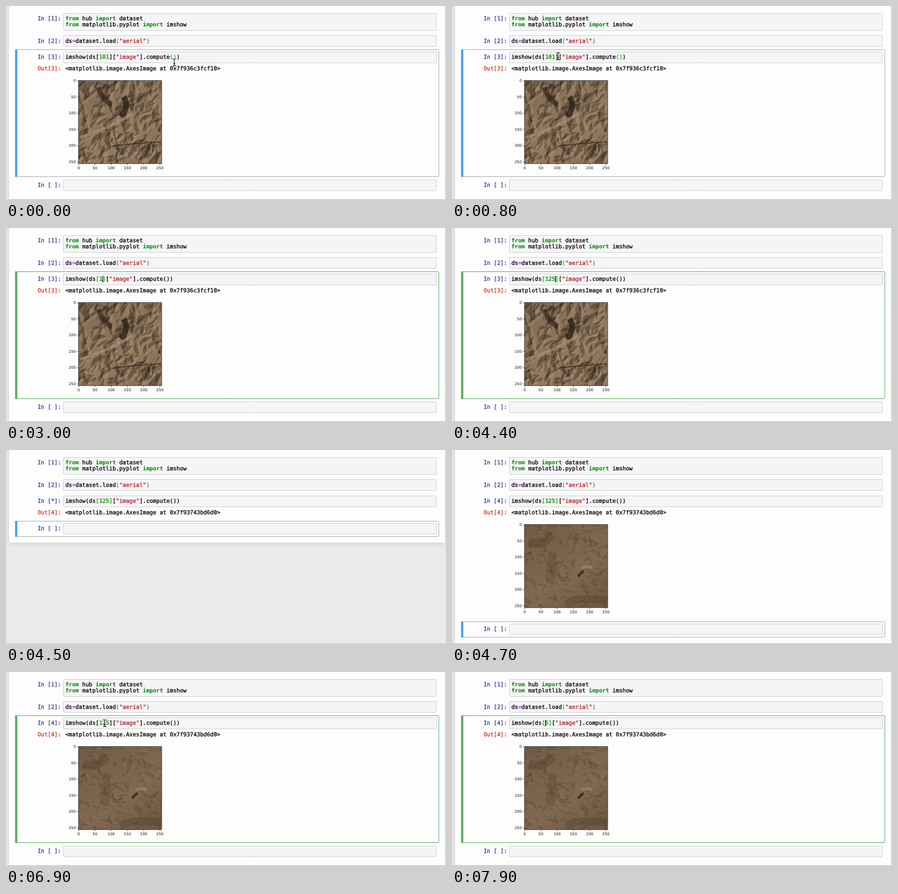
Write an HTML page with a canvas that moves like this. It is 800 by 353 pixels and loops after 8000 ms.

```html
<!DOCTYPE html>
<html lang="en">
<head>
<meta charset="utf-8">
<title>Notebook</title>
<style>
  html, body { margin: 0; width: 100%; height: 100%; overflow: hidden; background: #ebe9ec; }
  canvas { display: block; width: 800px; height: 353px; }
</style>
</head>
<body>
<canvas id="stage" width="800" height="353"></canvas>
<script>
const ctx = document.getElementById('stage').getContext('2d');
const LOOP = 8000, RUN = 4500, DONE = 4600, CLICK1 = 1000, CLICK2 = 6100, BLINK = 500;
const MONO = '"DejaVu Sans Mono", "Liberation Mono", monospace';
const SIZE = 10.18, CHAR = SIZE * 0.60205, CODE_X = 108;
const INK = '#000', KEY = '#008000', NUM = '#008800', STR = '#ba2121', MATCH = '#00bb00';
const IN = '#303f9f', OUT = '#d03a1b', BLUE = '#429fee', GREEN = '#54ad59';

// Clicks place the caret; '<' is backspace, other keys are typed
const keys = [
  { at: CLICK1, caret: 3 }, { at: 2400, key: '<' }, { at: 2800, key: '<' },
  { at: 3100, key: '2' }, { at: 3400, key: '5' },
  { at: CLICK2, caret: 2 }, { at: 7200, key: '<' }, { at: 7500, key: '<' }
];

function editAt(t) {
  let index = '101', caret = -1, since = 0;
  for (const k of keys) {
    if (k.at > t) break;
    since = k.at;
    if (k.caret !== undefined) { caret = k.caret; continue; }
    const erase = k.key === '<';
    index = index.slice(0, erase ? caret - 1 : caret) + (erase ? '' : k.key) + index.slice(caret);
    caret += erase ? -1 : 1;
  }
  return { index, caret, since };
}

const moves = [
  { from: 0, to: 900, x: 189, y: 91 },
  { from: 1100, to: 1300, x: 200.5, y: 93 },
  { from: 5300, to: 5800, x: 179.5, y: 93 }
];

function text(runs, x, y) {
  ctx.lineWidth = 0.3;
  for (const [str, color = INK, weight = ''] of runs) {
    ctx.font = `${weight} ${SIZE}px ${MONO}`;
    ctx.fillStyle = ctx.strokeStyle = color;
    ctx.fillText(str, x, y);
    if (!weight) ctx.strokeText(str, x, y);
    x += ctx.measureText(str).width;
  }
}

function prompt(str, y, color = IN) {
  text([[str, color]], 100.3 - str.length * CHAR, y);
}

function box(x, y, w, h, fill, stroke) {
  ctx.beginPath();
  ctx.roundRect(x, y, w, h, 1.5);
  if (fill) { ctx.fillStyle = fill; ctx.fill(); }
  ctx.strokeStyle = stroke;
  ctx.lineWidth = 1;
  ctx.stroke();
}

const field = (y, h) => box(104.5, y, 678, h, '#f5f4f6', '#cfced1');

function selection(y, h, bar, border) {
  box(17.5, y, 769.5, h, null, border);
  ctx.fillStyle = bar;
  ctx.fillRect(16.5, y - 0.5, 4, h + 1);
}

function seeded(seed) {
  return () => (seed = (seed * 16807) % 2147483647) / 2147483647;
}

// Ground seen from above: a gradient, then folds with one dark and one lit side
function aerial({ seed, tones, count, size, tilt, spread, dark, light }, marks) {
  const c = document.createElement('canvas');
  c.width = c.height = 152;
  const g = c.getContext('2d'), rnd = seeded(seed);
  const base = g.createLinearGradient(0, 0, 110, 152);
  tones.forEach((tone, i) => base.addColorStop(i / (tones.length - 1), tone));
  g.fillStyle = base;
  g.fillRect(0, 0, 152, 152);
  g.filter = 'blur(0.6px)';
  for (let i = 0; i < count; i++) {
    const len = size * (1.2 - i / count) * (0.4 + rnd()), wide = len * (0.15 + rnd() * 0.25);
    g.save();
    g.translate(rnd() * 152, rnd() * 152);
    g.rotate(tilt + (rnd() - 0.5) * spread);
    for (const [color, side] of [[dark, 1], [light, -1]]) {
      g.fillStyle = color;
      g.beginPath();
      g.moveTo(-len / 2, 0);
      g.quadraticCurveTo(len * (rnd() - 0.5), side * wide * 2, len / 2, 0);
      g.fill();
    }
    g.restore();
  }
  marks(g);
  return c;
}

function curve(g, color, width, ...p) {
  g.strokeStyle = color;
  g.lineWidth = width;
  g.beginPath();
  g.moveTo(p[0], p[1]);
  g.quadraticCurveTo(...p.slice(2));
  g.stroke();
}

const hills = aerial({
  seed: 17, tones: ['#7d6850', '#8a7259', '#937b60', '#8a735a'], count: 330, size: 25, tilt: 2.1, spread: 1.5,
  dark: 'rgba(40,31,23,.36)', light: 'rgba(180,152,120,.27)'
}, g => {
  curve(g, 'rgba(36,28,21,.75)', 10, 82, 30, 94, 46, 78, 66);
  curve(g, 'rgba(36,28,21,.6)', 9, 36, 12, 42, 34, 60, 44);
  curve(g, 'rgba(184,152,122,.55)', 5, 2, 104, 50, 90, 98, 61);
  curve(g, 'rgba(36,28,21,.6)', 2, 60, 120, 110, 114, 151, 112);
});
const plain = aerial({
  seed: 91, tones: ['#705b44', '#7b634b', '#816a52', '#725b43'], count: 330, size: 17, tilt: 1.8, spread: 5,
  dark: 'rgba(58,45,32,.17)', light: 'rgba(160,130,100,.11)'
}, g => {
  curve(g, 'rgba(62,51,37,.25)', 16, 8, 32, 30, 42, 52, 18);
  curve(g, 'rgba(58,46,33,.2)', 14, 48, 50, 58, 80, 46, 108);
  curve(g, 'rgba(57,45,33,.22)', 15, 75, 145, 110, 132, 151, 139);
  curve(g, 'rgba(178,132,104,.65)', 5, 104, 80, 112, 75, 124, 79);
  curve(g, 'rgba(38,29,22,.8)', 4, 98, 95, 102, 89, 108, 85);
});

function plot(photo) {
  const x0 = 131.8, y0 = 135.6, side = 151.3, step = side / 256;
  ctx.drawImage(photo, x0, y0, side, side);
  ctx.strokeStyle = '#222';
  ctx.lineWidth = 0.8;
  ctx.strokeRect(x0, y0, side, side);
  ctx.font = '6.8px "DejaVu Sans", sans-serif';
  ctx.fillStyle = '#111';
  ctx.beginPath();
  for (let v = 0; v <= 250; v += 50) {
    const d = (v + 0.5) * step;
    ctx.moveTo(x0 + d, y0 + side);
    ctx.lineTo(x0 + d, y0 + side + 2.5);
    ctx.moveTo(x0, y0 + d);
    ctx.lineTo(x0 - 2.5, y0 + d);
    ctx.textAlign = 'center';
    ctx.fillText(v, x0 + d, 296.7);
    ctx.textAlign = 'right';
    ctx.fillText(v, 127, y0 + d + 2.4);
  }
  ctx.stroke();
  ctx.textAlign = 'left';
}

function pointer(t) {
  if ((t >= 2500 && t < 5300) || t >= 7200) return;
  let x = 306, y = 102.5;
  for (const m of moves) {
    if (t < m.from) break;
    const u = Math.min(1, (t - m.from) / (m.to - m.from)), e = u * u * (3 - 2 * u);
    x += (m.x - x) * e;
    y += (m.y - y) * e;
  }
  for (const [color, width] of [['#fff', 2.8], ['#111', 1.2]]) {
    ctx.strokeStyle = color;
    ctx.lineWidth = width;
    ctx.beginPath();
    for (const s of [-1, 1]) {
      ctx.moveTo(x - 3.2, y + s * 6.5);
      ctx.quadraticCurveTo(x, y + s * 6.5, x, y + s * 4.5);
      ctx.quadraticCurveTo(x, y + s * 6.5, x + 3.2, y + s * 6.5);
    }
    ctx.moveTo(x, y - 5);
    ctx.lineTo(x, y + 5);
    ctx.moveTo(x - 1.6, y + 2.2);
    ctx.lineTo(x + 1.6, y + 2.2);
    ctx.stroke();
  }
}

function page(bottom) {
  ctx.fillStyle = '#ebe9ec';
  ctx.fillRect(0, 0, 800, 353);
  ctx.save();
  ctx.shadowColor = 'rgba(87,87,87,.25)';
  ctx.shadowBlur = 9;
  ctx.fillStyle = '#fefdfe';
  ctx.fillRect(5.5, -20, 792.5, bottom + 20);
  ctx.restore();
  ctx.fillStyle = '#c4c3c6';
  ctx.fillRect(0, 352, 800, 1);
}

function draw(t) {
  const { index, caret, since } = editAt(t);
  const running = t >= RUN && t < DONE, ran = t >= RUN;
  const editing = (t >= CLICK1 && t < RUN) || t >= CLICK2;
  const last = running ? 133.5 : 316.5;

  page(last + 35);
  if (editing) selection(79.5, 231, GREEN, GREEN);
  else if (t < CLICK1) selection(79.5, 231, BLUE, '#ababab');
  else selection(last - 4, 28, BLUE, '#ababab');

  field(13.5, 31);
  prompt('In [1]:', 26.2);
  text([['from', KEY, 'bold'], [' hub '], ['import', KEY, 'bold'], [' dataset']], CODE_X, 26.2);
  text([['from', KEY, 'bold'], [' matplotlib.pyplot '], ['import', KEY, 'bold'], [' imshow']], CODE_X, 37);

  field(53.5, 20);
  prompt('In [2]:', 66.5);
  text([['ds'], ['=', '#aa22ff', 'bold'], ['dataset.load'], ['(', MATCH], ['"aerial"', STR], [')', MATCH]], CODE_X, 66.5);

  field(83.5, 20);
  prompt(running ? 'In [*]:' : ran ? 'In [4]:' : 'In [3]:', 96);
  const bracket = caret === 0 || caret === index.length ? MATCH : INK;
  const paren = t < CLICK1 ? MATCH : INK;
  text([
    ['imshow(ds'], ['[', bracket], [index, NUM], [']', bracket], ['['], ['"image"', STR],
    ['].compute'], ['()', paren], [')']
  ], CODE_X, 96);
  if (editing && (t - since) % (2 * BLINK) < BLINK) {
    ctx.fillStyle = INK;
    ctx.fillRect(CODE_X + (10 + caret) * CHAR, 87.5, 1.2, 11.5);
  }

  prompt(ran ? 'Out[4]:' : 'Out[3]:', 116.5, OUT);
  text([[`<matplotlib.image.AxesImage at ${ran ? '0x7f93743bd6d0' : '0x7f936c3fcf10'}>`]], CODE_X, 117);
  if (!running) plot(ran ? plain : hills);

  field(last, 19.5);
  prompt('In [ ]:', last + 12.2);
  pointer(t);
}

ctx.textRendering = 'geometricPrecision';
const begin = performance.now();
function tick() {
  draw((performance.now() - begin) % LOOP);
  requestAnimationFrame(tick);
}
tick();
</script>
</body>
</html>
```
